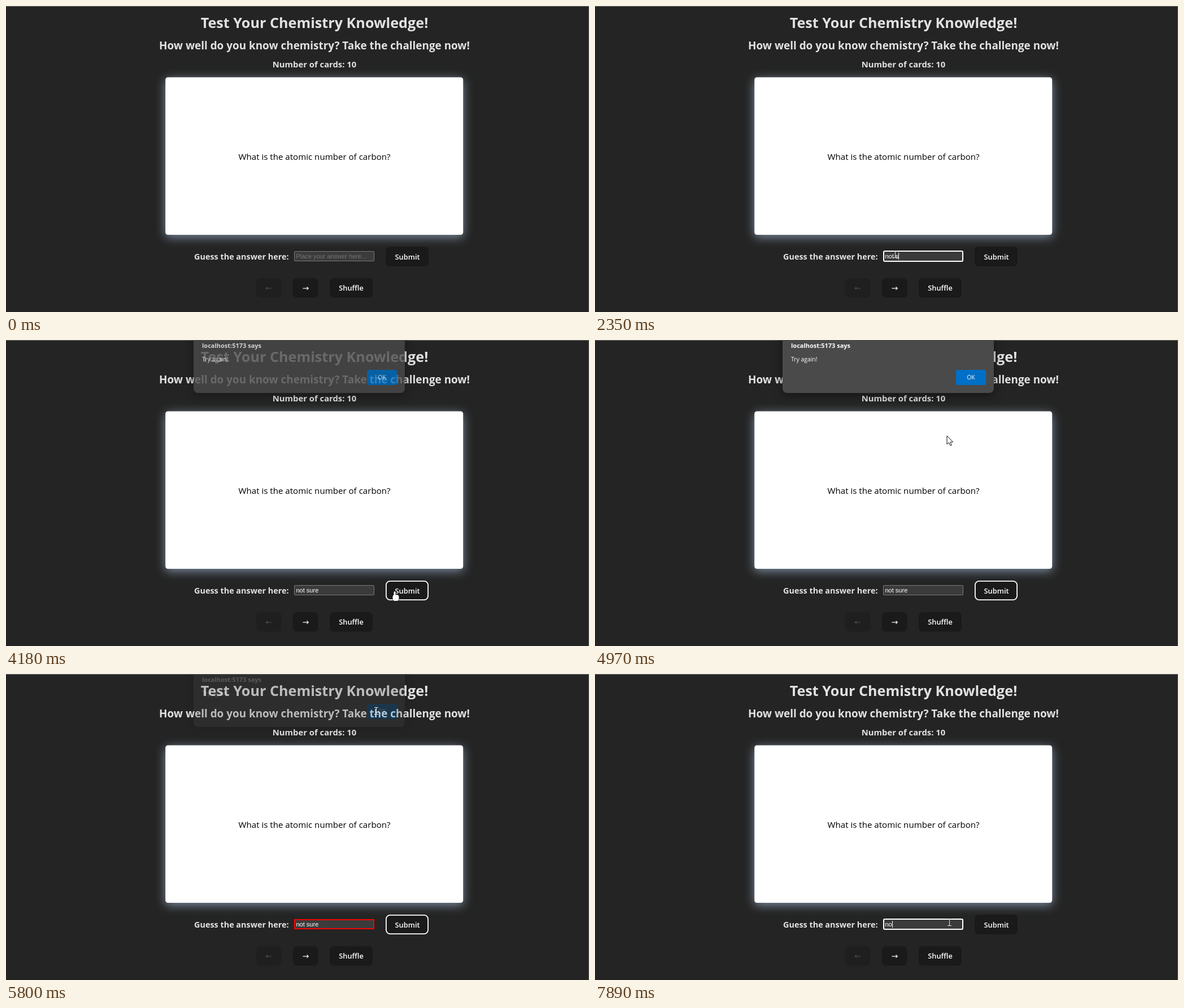
An HTML page with a canvas that plays this animation: 1032 px wide and 543 px high, repeating every 8 s.

```html
<!DOCTYPE html>
<html lang="en">
<head>
<meta charset="utf-8">
<title>Chemistry flashcards</title>
<style>
html, body { margin: 0; width: 100%; height: 100%; overflow: hidden; background: #242424; }
canvas { display: block; }
</style>
</head>
<body>
<canvas id="stage" width="1032" height="543"></canvas>
<script>
const LOOP = 8000;
const UI = '"Open Sans", "Noto Sans", sans-serif';
const FIELD = '11px "Liberation Sans", Arial, sans-serif';
const INK = '#e2e2e2';
const SUBMIT = { x: 672, y: 427, w: 76, h: 35 };
const INPUT = { x: 510, y: 435, w: 142, h: 18 };
const RING = { x: 510, y: 434, w: 142, h: 20 };

const GUESS = 'not sure';
const TYPING = { start: 1750, end: 2710 };
const ERASING = { start: 7190, end: 7790, letters: 6 };
const CLICK = { input: 1210, submit: 3850, ok: 5450, retry: 6730 };
const CLICK_LENGTH = 210;
const DIALOG = { show: 4040, hide: 5665, fade: 200 };

const SPOT = {
  entry: { x: 955, y: 535 },
  input: { x: 531, y: 441 },
  submit: { x: 688, y: 447 },
  ok: { x: 655, y: 66 },
  retry: { x: 627, y: 441 }
};
const MOVES = [
  { start: 460, end: 1010, from: SPOT.entry, via: { x: 720, y: 432 }, to: SPOT.input },
  { start: 3240, end: 3650, from: SPOT.input, via: { x: 620, y: 448 }, to: SPOT.submit },
  { start: 4580, end: 5180, from: SPOT.submit, via: { x: 570, y: 250 }, to: SPOT.ok },
  { start: 5800, end: 6400, from: SPOT.ok, via: { x: 650, y: 300 }, to: SPOT.retry }
];

const main = document.getElementById('stage').getContext('2d');
const dialog = document.createElement('canvas');
dialog.width = 1032;
dialog.height = 130;

const clamp = v => Math.max(0, Math.min(1, v));
const smooth = v => clamp(v) ** 2 * (3 - 2 * clamp(v));
const between = (t, from, to) => t >= from && t < to;
const inside = (r, p) => p.x >= r.x && p.x <= r.x + r.w && p.y >= r.y && p.y <= r.y + r.h;

function box(c, x, y, w, h, radius, fill) {
  c.beginPath();
  c.roundRect(x, y, w, h, radius);
  c.fillStyle = fill;
  c.fill();
}

// Stroke lying fully inside the rectangle.
function outline(r, radius, width, color) {
  main.beginPath();
  main.roundRect(r.x + width / 2, r.y + width / 2, r.w - width, r.h - width, radius);
  main.lineWidth = width;
  main.strokeStyle = color;
  main.stroke();
}

function text(c, str, x, y, font, color, align = 'center') {
  c.font = font;
  c.textAlign = align;
  c.fillStyle = color;
  c.fillText(str, x, y);
}

function line(width, color, ...points) {
  main.beginPath();
  points.forEach(([x, y]) => main.lineTo(x, y));
  main.lineWidth = width;
  main.strokeStyle = color;
  main.stroke();
}

// Number of evenly spaced key presses made so far.
function presses({ start, end }, total, t) {
  if (t < start) return 0;
  return Math.min(total, 1 + Math.floor((t - start) / (end - start) * (total - 1)));
}

function typedText(t) {
  const typed = presses(TYPING, GUESS.length, t);
  const erased = presses(ERASING, ERASING.letters, t);
  return GUESS.slice(0, typed - erased);
}

function pointerAt(t) {
  const move = MOVES.filter(m => t >= m.start).pop();
  if (!move) return null;
  const k = smooth((t - move.start) / (move.end - move.start));
  const bend = axis => (1 - k) ** 2 * move.from[axis] +
    2 * k * (1 - k) * move.via[axis] + k * k * move.to[axis];
  return { x: Math.round(bend('x')), y: Math.round(bend('y')) };
}

function drawHand() {
  const parts = grow => {
    const color = grow ? '#111' : '#fff';
    box(main, -1.5 - grow, -1 - grow, 3 + 2 * grow, 12 + 2 * grow, 1.5 + grow, color);
    box(main, -3.5 - grow, 5 - grow, 11 + 2 * grow, 11 + 2 * grow, 4 + grow, color);
  };
  parts(.8);
  parts(0);
}

function drawCursorArrow() {
  main.beginPath();
  main.moveTo(0, 0);
  main.lineTo(0, 15);
  main.lineTo(3.5, 12);
  main.lineTo(6, 17.5);
  main.lineTo(8.3, 16.5);
  main.lineTo(6, 11.2);
  main.lineTo(10.6, 11);
  main.closePath();
  main.fillStyle = '#fff';
  main.fill();
  main.lineWidth = 1;
  main.strokeStyle = '#111';
  main.stroke();
}

function drawBeam() {
  const color = '#e4e4e4';
  line(1, color, [-3, -6.5], [4, -6.5]);
  line(1, color, [.5, -6.5], [.5, 5.5]);
  line(1, color, [-3, 5.5], [4, 5.5]);
}

function drawPointer(t, p) {
  if (Object.values(CLICK).some(at => between(t, at, at + CLICK_LENGTH))) {
    box(main, p.x - 10, p.y - 10, 20, 20, 10, 'rgba(196,190,16,.78)');
  }
  const overHeading = p.y < 82 && t > CLICK.ok + CLICK_LENGTH;
  main.save();
  main.translate(p.x, p.y);
  if (inside(SUBMIT, p) && t < MOVES[2].start) drawHand();
  else if (inside(INPUT, p) || overHeading) drawBeam();
  else drawCursorArrow();
  main.restore();
}

function drawArrow(x, dir, color) {
  const y = 501;
  line(1.3, color, [x - 5 * dir, y], [x + 4.5 * dir, y]);
  line(1.3, color, [x + 2 * dir, y - 2.6], [x + 4.8 * dir, y], [x + 2 * dir, y + 2.6]);
}

function paintDialog() {
  const c = dialog.getContext('2d');
  c.shadowColor = 'rgba(0,0,0,.45)';
  c.shadowBlur = 18;
  c.shadowOffsetY = 3;
  box(c, 332, -20, 374, 114, 8, '#4a4a4a');
  c.shadowColor = 'transparent';
  text(c, 'localhost:5173 says', 347, 13.5, `bold 11px ${UI}`, '#fff', 'left');
  text(c, 'Try again!', 347, 37.5, `10.4px ${UI}`, '#fff', 'left');
  box(c, 639, 53, 53, 27, 3, '#0070c6');
  text(c, 'OK', 665.5, 70, `10.4px ${UI}`, '#fff');
}

function drawPage() {
  main.fillStyle = '#242424';
  main.fillRect(0, 0, 1032, 543);
  main.fillStyle = '#707070';
  main.fillRect(0, 0, 1032, 1);
  main.fillStyle = '#5a5a5a';
  main.fillRect(1031, 0, 1, 543);

  text(main, 'Test Your Chemistry Knowledge!', 546, 39, `bold 25.2px ${UI}`, INK);
  text(main, 'How well do you know chemistry? Take the challenge now!', 546, 77, `bold 18.9px ${UI}`, INK);
  text(main, 'Number of cards: 10', 546, 109, `bold 14.8px ${UI}`, INK);

  main.save();
  main.shadowColor = 'rgb(127,143,161)';
  main.shadowBlur = 18;
  main.shadowOffsetY = 4;
  box(main, 282.2, 126.4, 527, 279.6, 4.5, '#fff');
  main.restore();
  text(main, 'What is the atomic number of carbon?', 546, 273, `15.1px ${UI}`, '#000');

  text(main, 'Guess the answer here:', 333, 450, `bold 14.4px ${UI}`, INK, 'left');
  box(main, 443, 483, 44.5, 34.5, 6.5, '#1f1f1f');
  drawArrow(465, -1, '#484848');
  box(main, 508, 483, 44.5, 34.5, 6.5, '#1a1a1a');
  drawArrow(530.5, 1, '#f0f0f0');
  box(main, 573, 483, 76, 34.5, 6.5, '#1a1a1a');
  text(main, 'Shuffle', 611, 505, `600 12.8px ${UI}`, '#fff');
}

function drawSubmit(t, hovered) {
  const { x, y, w, h } = SUBMIT;
  box(main, x, y, w, h, 7, '#1a1a1a');
  if (between(t, CLICK.submit, CLICK.retry)) {
    outline(SUBMIT, 7, 1.8, '#fff');
  } else if (hovered) {
    const strength = smooth((t - MOVES[1].end + 130) / 250);
    outline(SUBMIT, 7, 1, `rgba(100,108,255,${strength})`);
  }
  text(main, 'Submit', 710.5, 449.5, `600 12.8px ${UI}`, '#fff');
}

function drawInput(t, hovered) {
  const focused = between(t, CLICK.input + 100, CLICK.submit) || t >= CLICK.retry;
  const wrong = between(t, CLICK.ok + 200, ERASING.start);
  box(main, INPUT.x, INPUT.y, INPUT.w, INPUT.h, 2, '#3b3b3b');
  if (wrong) outline(INPUT, 0, 2, '#f00606');
  if (focused) outline(RING, 2, wrong ? 1 : 2, '#fff');
  else if (!wrong) outline(INPUT, 1.5, 1, hovered ? '#b4b4b4' : '#787878');

  const value = typedText(t);
  text(main, value || 'Place your answer here...', 513.5, 448, FIELD, value ? '#fff' : '#757575', 'left');

  const caretOn = between(t, CLICK.input + 100, MOVES[1].start) || t >= ERASING.end + 100;
  if (caretOn) {
    main.fillStyle = '#fff';
    main.fillRect(Math.round(513.5 + main.measureText(value).width), 438, 1, 12);
  }
}

function render(t) {
  const p = pointerAt(t);
  const over = area => Boolean(p) && inside(area, p);
  drawPage();
  drawSubmit(t, over(SUBMIT));
  drawInput(t, over(INPUT));

  main.globalAlpha = smooth((t - DIALOG.show) / DIALOG.fade) - smooth((t - DIALOG.hide) / DIALOG.fade);
  main.drawImage(dialog, 0, 0);
  main.globalAlpha = 1;

  if (p) drawPointer(t, p);
}

function tick() {
  render(performance.now() % LOOP);
  requestAnimationFrame(tick);
}

paintDialog();
tick();
</script>
</body>
</html>
```
